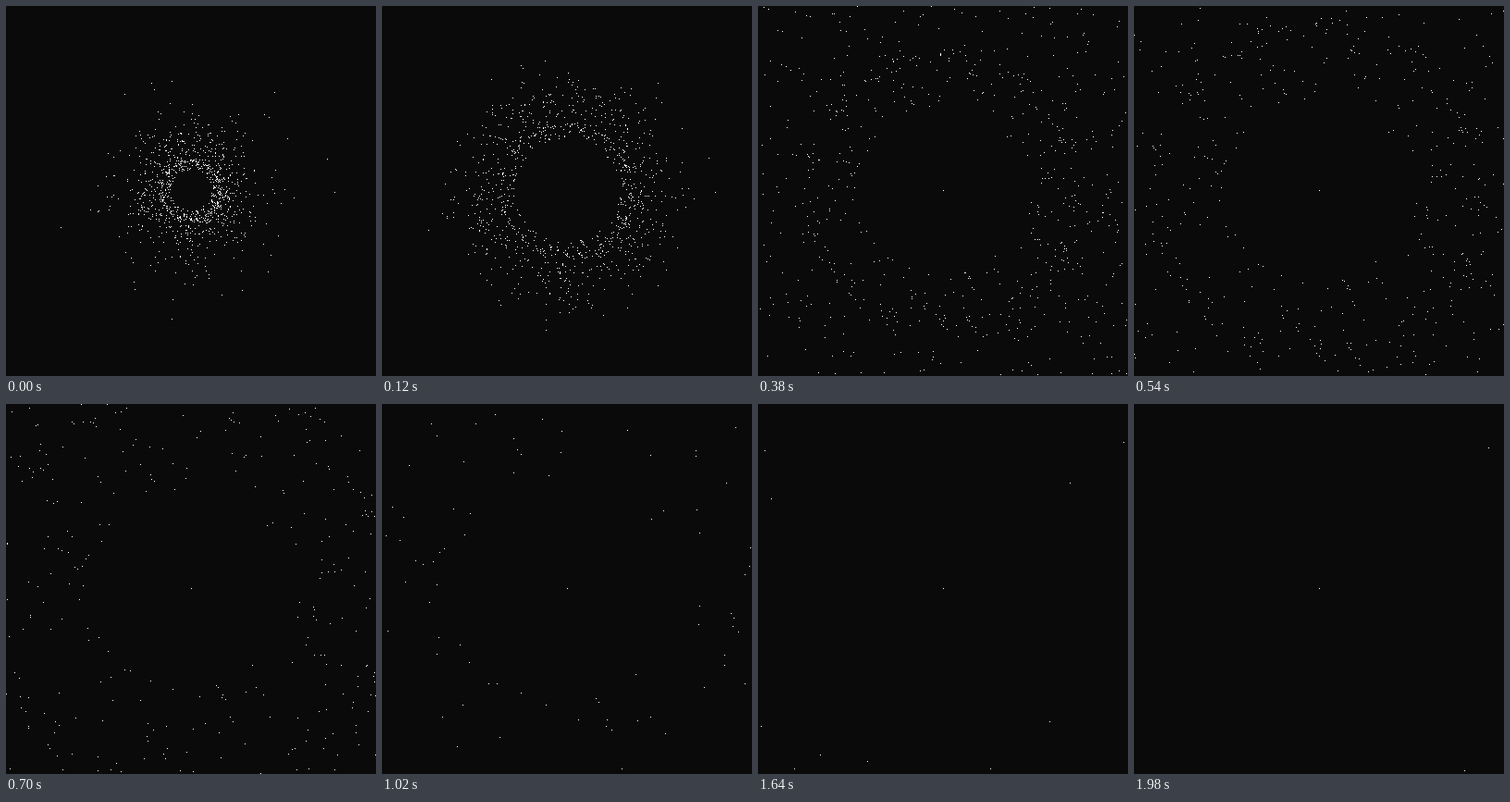
Write an HTML page with a canvas that moves like this. It is 400x400 px and loops after 2000 ms.

```html
<!DOCTYPE html>
<html>
<head>
<meta charset="utf-8">
<style>
html, body { margin: 0; width: 100%; height: 100%; overflow: hidden; background: #0a0a0a; }
canvas { display: block; }
</style>
</head>
<body>
<canvas id="stage" width="400" height="400"></canvas>
<script>
const ctx = document.getElementById('stage').getContext('2d');
const TAU = Math.PI * 2, LOOP = 2000, STEP = 20;

let seed = 71;
function rand() {
  seed = (seed * 1664525 + 1013904223) % 4294967296;
  return seed / 4294967296;
}

// Keys over time: inner edge, log of the spread, length of the outer tail
const times = [0, 100, 220, 380, 700, 1020, 1340, 1980];
const edge = [22, 52, 75, 90, 105, 115, 132, 200];
const spread = [18, 41, 88, 215, 444, 980, 2000, 12000].map(Math.log);
const tail = [18, 10, 4, 0, 0, 0, 0, 0];

function at(keys, t) {
  let i = 1;
  while (i < times.length - 1 && t > times[i]) i++;
  const k = (t - times[i - 1]) / (times[i] - times[i - 1]);
  return keys[i - 1] + (keys[i] - keys[i - 1]) * k;
}

function particle(u, angle) {
  return { u, far: -Math.log(1 - u), x: Math.cos(angle), y: Math.sin(angle) };
}

// Two slow stragglers, an even cloud, and a clumped second shell
const particles = [
  particle(0.0032, Math.atan2(-151.5, 183.5)),
  particle(0.0044, Math.atan2(198, 158.5))
];
for (let i = 0; i < 860; i++) {
  particles.push(particle(0.008 + 0.991 * rand(), rand() * TAU));
}
for (let i = 0; i < 130; i++) {
  const clump = (i % 13) / 13 * TAU;
  particles.push(particle(0.22 + 0.07 * rand(), clump + (rand() + rand() - 1) * 0.25));
}

function draw(t) {
  const inner = at(edge, t), size = Math.exp(at(spread, t)), reach = at(tail, t);
  ctx.fillStyle = '#0a0a0a';
  ctx.fillRect(0, 0, 400, 400);
  ctx.fillStyle = '#fff';
  for (const p of particles) {
    const r = inner + size * p.u + reach * p.far;
    ctx.fillRect(Math.floor(200 + r * p.x), Math.floor(199.5 + r * p.y), 1, 1);
  }
  if (t >= 300) ctx.fillRect(200, 199, 1, 1);
}

const start = performance.now();
function tick() {
  const t = (performance.now() - start) % LOOP;
  draw(Math.floor(t / STEP) * STEP);
  requestAnimationFrame(tick);
}
tick();
</script>
</body>
</html>
```
